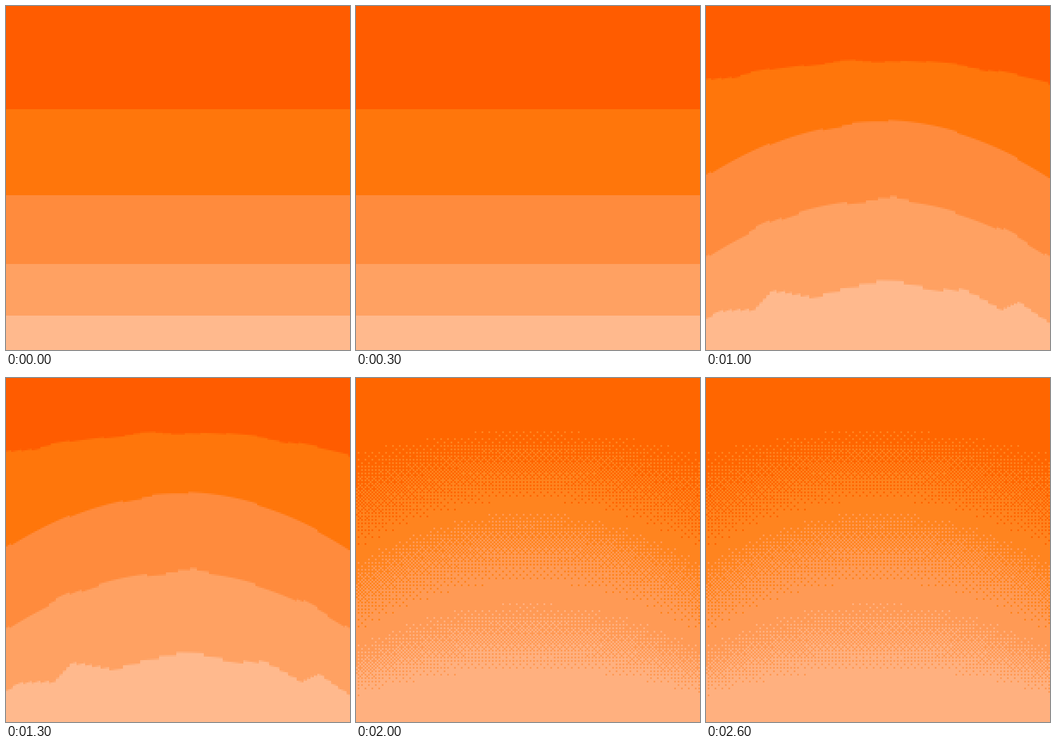
Recreate the animation shown at these times as an HTML page with a canvas. Size 600 px wide and 600 px high, loop 3000 ms.

```html
<!DOCTYPE html>
<html lang="en">
<head>
<meta charset="utf-8">
<title>Orange bands</title>
<style>
  html, body { margin: 0; width: 100%; height: 100%; overflow: hidden; background: #ff5c00; }
  canvas {
    position: absolute; left: 0; top: 0; width: 100%; height: 100%;
    image-rendering: pixelated;
  }
  .soft { image-rendering: auto; }
  /* Each stage is up for one sixth of the loop; the dithered one lies beneath. */
  .stage { animation: stage 3s step-end infinite; }
  @keyframes stage {
    0% { visibility: visible; }
    16.666%, 100% { visibility: hidden; }
  }
</style>
</head>
<body>
<script>
const N = 200;       // cells per side, 3px each
const PERIOD = 128;  // the ragged edges repeat after this many cells
const rgb = hex => [16, 8, 0].map(s => hex >> s & 255);
const BANDS = [0xff5c00, 0xff760b, 0xff8b3d, 0xffa162, 0xffb98d].map(rgb);
const TONES = [0xff6600, 0xff841f, 0xff9a55, 0xffb07f].map(rgb);

// flat: straight edge; base: mean ragged edge; turns: [x, offset] at the main turns
const EDGES = [
  { flat: 60, base: 62, turns: [[6, -2.2], [25, 1], [36, -1], [72, 1], [85, -2.4], [98, 1], [115, -1]] },
  { flat: 110, base: 112, turns: [[4, -0.7], [48, 0.6], [81, 1.8], [88, 0.4], [110, -0.8]] },
  { flat: 150, base: 152, turns: [[30, 1], [40, -1.3], [53, 1], [72, -0.2], [91, 0.9], [107, -1.8], [118, 0]] },
  { flat: 180, base: 182, turns: [[15, -1], [35, 3], [46, -2], [68, 3], [105, -1.2], [127, 1]] }
];

const clamp = (v, lo, hi) => Math.min(hi, Math.max(lo, v));
const mix = (a, b, t) => a + (b - a) * t;

// Edge height in whole cells, straight between turns and wrapping round.
function ragged({ base, turns }, x) {
  const first = turns[0];
  const pos = first[0] + (Math.floor(x) - first[0] + 2 * PERIOD) % PERIOD;
  const line = [...turns, [first[0] + PERIOD, first[1]]];
  const i = line.findIndex(p => p[0] > pos);
  const [x0, y0] = line[i - 1], [x1, y1] = line[i];
  return base + Math.round(mix(y0, y1, (pos - x0) / (x1 - x0)));
}

// Lens at the bottom centre: spreads the ragged edge sideways and lifts it.
function bulged(edge, x) {
  const d = (x + 0.5) / 100 - 1;
  const u = 100 + 100 * d * (0.8 + 0.12 * Math.abs(d));
  const r = 600 - 3 * ragged(edge, u);
  const centre = r * (2.675 - 0.0717 * Math.sqrt(r));
  const rim = r * (1.26 - 0.00025 * r) - 13;
  return (600 - mix(centre, rim, d * d)) / 3;
}

function grid(pixel) {
  const cells = [];
  for (let y = 0; y < N; y++)
    for (let x = 0; x < N; x++) cells.push(pixel(x, y));
  return cells;
}

function layers(edgeAt) {
  const lines = EDGES.map(e => Array.from({ length: N }, (_, x) => edgeAt(e, x)));
  return grid((x, y) => lines.reduce((c, line, i) => {
    const cover = clamp(y + 1 - line[x], 0, 1);
    return c.map((v, k) => mix(v, BANDS[i + 1][k], cover));
  }, BANDS[0]));
}

function boxBlur(cells, r, dx, dy) {
  return grid((x, y) => {
    const sum = [0, 0, 0];
    for (let i = -r; i <= r; i++) {
      const px = clamp(x + i * dx, 0, N - 1), py = clamp(y + i * dy, 0, N - 1);
      const c = cells[py * N + px];
      for (let k = 0; k < 3; k++) sum[k] += c[k];
    }
    return sum.map(v => v / (2 * r + 1));
  });
}

function blur(cells) {
  for (let pass = 0; pass < 3; pass++)
    cells = boxBlur(boxBlur(cells, 3, 1, 0), 3, 0, 1);
  return cells;
}

// 4x4 Bayer threshold, 0 to 15
function bayer(x, y) {
  const quad = (a, b) => 2 * (a ^ b) + b;
  return 4 * quad(x & 1, y & 1) + quad(x >> 1 & 1, y >> 1 & 1);
}

// Each tone fades into the next between two arcs, in px.
const FADES = [
  { top: 89, topSag: 41, end: 213, endSag: 85, bend: 0 },
  { top: 232, topSag: 86.5, end: 355, endSag: 91, bend: 0.35 },
  { top: 391, topSag: 75.5, end: 508, endSag: 45.5, bend: 0 }
];

function dither(x, y) {
  const q = ((x + 0.5) / 100 - 1) ** 2;
  const limit = 15 - bayer(x + 3, y);
  const passed = FADES.filter(f => {
    const from = f.top + f.topSag * q, to = f.end + f.endSag * q;
    const t = (y * 3 - from) / (to - from);
    const bent = t + f.bend * clamp(t * (1 - t), 0, 1);
    return bent * 15 >= limit;
  });
  return TONES[passed.length];
}

function show(cells, name) {
  const canvas = document.createElement("canvas");
  canvas.width = canvas.height = N;
  canvas.className = name;
  const ctx = canvas.getContext("2d");
  const image = ctx.createImageData(N, N);
  cells.forEach((c, i) => image.data.set([...c.map(Math.round), 255], i * 4));
  ctx.putImageData(image, 0, 0);
  document.body.append(canvas);
  return canvas;
}

const arcs = layers(bulged);
show(grid(dither), "");
[
  show(layers(e => e.flat), "stage"),
  show(layers(ragged), "stage"),
  show(arcs, "stage"),
  show(blur(arcs), "stage soft")
].forEach((canvas, i) => canvas.style.animationDelay = `${500 * i - 3000}ms`);
</script>
</body>
</html>
```
